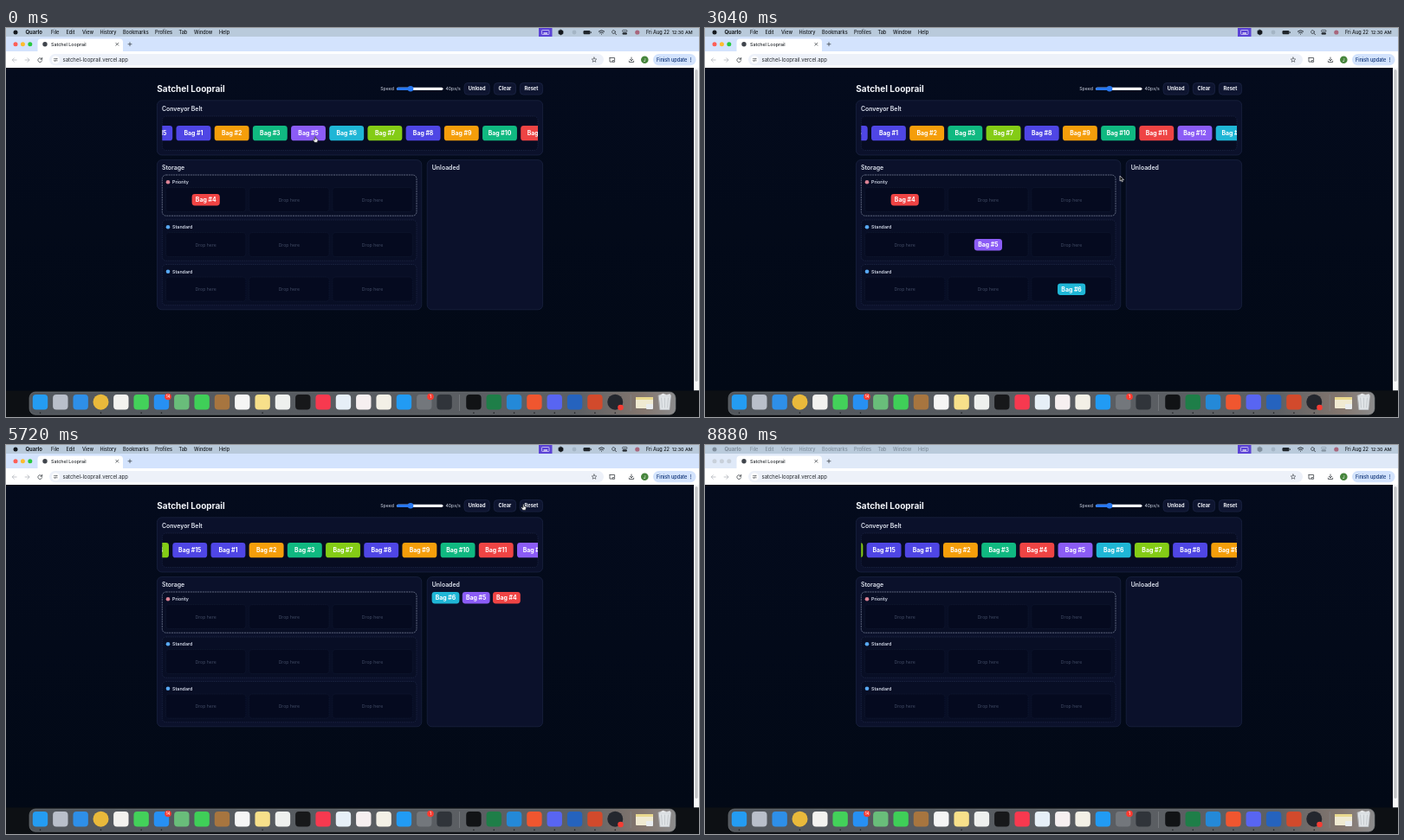
Write an HTML page with a canvas that moves like this. It is 800 px wide and 450 px high and loops after 8.92 s.

```html
<!DOCTYPE html>
<html lang="en">
<head>
<meta charset="utf-8">
<title>Satchel Looprail</title>
<style>
  html, body { margin: 0; width: 100%; height: 100%; overflow: hidden; background: #020818; }
  canvas { display: block; width: 800px; height: 450px; }
</style>
</head>
<body>
<canvas id="stage"></canvas>
<script>
const LOOP = 8920;
const DROP_A = 660, DROP_B = 2500, UNLOAD = 4640, RESET = 5980, BLUR = 8760;
const PITCH = 44.19, SPEED = 0.0166;
const FONT = 'Inter, "Open Sans", sans-serif';
const BAG_COLORS = ['#4f46e5', '#f59e0b', '#10b981', '#ef4444', '#8b5cf6', '#1fb6d6', '#84cc16'];
const SLOT_X = [184.5, 280.7, 376.9], RACK_Y = [170, 222, 273.5];

const canvas = document.getElementById('stage');
const ctx = canvas.getContext('2d');
const dpr = window.devicePixelRatio || 1;
canvas.width = 800 * dpr;
canvas.height = 450 * dpr;

function rect(x, y, w, h, color) {
  ctx.fillStyle = color;
  ctx.fillRect(x, y, w, h);
}

function box(x, y, w, h, r, fill, stroke, dash) {
  ctx.beginPath();
  ctx.roundRect(x, y, w, h, r);
  if (fill) { ctx.fillStyle = fill; ctx.fill(); }
  if (stroke) {
    ctx.setLineDash(dash || []);
    ctx.strokeStyle = stroke;
    ctx.lineWidth = 0.6;
    ctx.stroke();
    ctx.setLineDash([]);
  }
}

function dot(x, y, r, color) {
  ctx.beginPath();
  ctx.arc(x, y, r, 0, Math.PI * 2);
  ctx.fillStyle = color;
  ctx.fill();
}

function text(s, x, y, size, color, weight = 400, align = 'left') {
  ctx.font = `${weight} ${size}px ${FONT}`;
  ctx.textAlign = align;
  ctx.fillStyle = color;
  ctx.fillText(s, x, y);
}

function path(d, x, y, color, width = 0.8, fill) {
  ctx.save();
  ctx.translate(x, y);
  const p = new Path2D(d);
  if (fill) { ctx.fillStyle = fill; ctx.fill(p); }
  ctx.strokeStyle = color;
  ctx.lineWidth = width;
  ctx.lineCap = ctx.lineJoin = 'round';
  ctx.stroke(p);
  ctx.restore();
}

// Menu bar, tab strip and toolbar

function drawMenuBar(active) {
  rect(0, 0, 800, 10, '#b9cadb');
  const ink = active ? '#14181d' : '#7f8d9b';
  dot(11, 5, 2.5, ink);
  text('Quarlo', 22.5, 7, 5.9, ink, 700);
  const items = [['File', 52], ['Edit', 69.5], ['View', 88], ['History', 108.5], ['Bookmarks', 135],
    ['Profiles', 172], ['Tab', 199.5], ['Window', 217], ['Help', 246]];
  for (const [label, x] of items) text(label, x, 7, 5.5, ink, 500);

  rect(615, 0, 15.5, 10, '#5b43d6');
  box(618.5, 2.5, 8.5, 5, 0.8, null, '#fff');
  rect(620.5, 5.4, 4.5, 1.2, '#fff');
  path('M0 -3L2.6 -1.5V1.5L0 3L-2.6 1.5V-1.5Z', 640.5, 5, ink, 0.5, ink);
  dot(656, 5, 2.4, '#a4b5c5');
  box(666.5, 3, 8, 4.3, 1.2, '#20262c');
  rect(675, 4.3, 0.7, 1.7, '#20262c');
  path('M-3.2 -1Q0 -3.7 3.2 -1M-1.9 0.6Q0 -1 1.9 0.6M0 2.1V2.2', 687.5, 5, '#14181d', 0.9);
  path('M1.4 -0.4A1.9 1.9 0 1 1 1.4 -0.5M0.9 1L2.5 2.7', 702, 5, '#14181d', 0.7);
  box(711.5, 2.4, 5.5, 2.1, 1, null, ink);
  box(711.5, 5.4, 5.5, 2.1, 1, ink);
  dot(728.8, 5, 2.6, '#a8667c');
  text('Fri Aug 22', 739, 7, 5.5, '#14181d', 500);
  text('12:30 AM', 792.5, 7, 5.3, '#14181d', 500, 'right');
}

function drawBrowser(active) {
  rect(0, 10, 800, 17.5, active ? '#d3e3fd' : '#dfe9f8');
  const lights = active ? ['#fe5f57', '#febc2e', '#28c840'] : ['#c8d0da', '#c8d0da', '#c8d0da'];
  lights.forEach((c, i) => dot(11 + i * 8.4, 18.7, 2.5, c));
  box(36.5, 12.5, 98.5, 18, 4, '#fff');
  rect(0, 27, 800, 19, '#fff');
  dot(45, 18.7, 2.7, '#40454c');
  text('Satchel Looprail', 52, 20.6, 5.3, '#24282d', 500);
  path('M-1.5 -1.5L1.5 1.5M1.5 -1.5L-1.5 1.5', 128.3, 18.7, '#33383d', 0.7);
  path('M-2 0H2M0 -2V2', 143, 18.7, '#33383d', 0.7);

  path('M2.4 0H-2.4M-0.3 -2.2L-2.5 0L-0.3 2.2', 9.7, 37, '#b4b8be');
  path('M-2.4 0H2.4M0.3 -2.2L2.5 0L0.3 2.2', 24.5, 37, '#b4b8be');
  path('M2.1 -1A2.4 2.4 0 1 0 2.3 0.8M2.4 -2.6V-0.8H0.6', 39.3, 37, '#3c4146');
  box(50, 30, 640, 13.3, 6.6, '#edf1f9');
  dot(57.3, 36.7, 4.5, '#fff');
  path('M-2 -1.1H0M1.3 -1.1H2M-2 1.1H-1.3M0 1.1H2M0 -1.1A0.6 0.6 0 1 0 1.3 -1.1M-1.3 1.1A0.6 0.6 0 1 0 0 1.1',
    57.3, 36.7, '#3c4146', 0.6);
  text('satchel-looprail.vercel.app', 65.5, 38.8, 6, '#24282d');
  path('M0 -2.8L0.8 -0.9L2.8 -0.8L1.3 0.5L1.8 2.5L0 1.4L-1.8 2.5L-1.3 0.5L-2.8 -0.8L-0.8 -0.9Z',
    679, 36.8, '#3c4146', 0.6);
  path('M-2.8 -2.3H2.8V0M-2.8 -2.3V2.3H0M0.8 0.8H2.8V2.5H0.8Z', 699.8, 36.8, '#3c4146');
  path('M0 -2.8V1M-1.7 -0.5L0 1.2L1.7 -0.5M-2.6 1.3V2.7H2.6V1.3', 722, 36.8, '#3c4146');
  dot(737.3, 36.8, 4.3, '#46853c');
  text('J', 737.3, 38.6, 5, '#fff', 400, 'center');
  box(747, 30, 49.5, 13.3, 6.6, '#d3e3fd');
  text('Finish update', 751, 38.8, 5.5, '#0a2f73', 500);
  for (let i = -1; i < 2; i++) dot(790.5, 36.8 + i * 1.9, 0.55, '#0a2f73');
}

// Dock

const DOCK = ['#249cf2', '#b9bfca', '#2e8fe8', '#e9b93b', '#f3f2ef', '#43d15a', '#2790f3', '#69bd7a',
  '#3fcf58', '#a7753f', '#f5f5f5', '#f7e08a', '#eef0ee', '#17181a', '#f7394f', '#e6eff7', '#f6eff0',
  '#f3f0e6', '#219bf4', '#73777c', '#30343a', '#111315', '#1e7e48', '#2489d8', '#f0562f', '#5865f2',
  '#2563be', '#d24a2c', '#24272e'];
const ROUND = [3, 28];
const RUNNING = [0, 3, 5, 6, 11, 21, 22, 23, 24, 25, 26, 27, 28];

function badge(x, y, label) {
  dot(x, y, 3.8, '#fb3b30');
  text(label, x, y + 1.6, 4.4, '#fff', 500, 'center');
}

function drawDock() {
  rect(0, 419.5, 800, 30.5, '#0d1014');
  const g = ctx.createLinearGradient(27, 0, 773, 0);
  g.addColorStop(0, '#52575d');
  g.addColorStop(0.85, '#5d6064');
  g.addColorStop(0.95, '#85776f');
  g.addColorStop(1, '#8b8b8c');
  box(27, 421, 746, 26.3, 7, g, '#787c80');
  DOCK.forEach((c, i) => {
    const x = 39.5 + i * 23.33 + (i > 20 ? 10.5 : 0);
    if (ROUND.includes(i)) dot(x, 432.7, 9, c);
    else box(x - 8.7, 424, 17.4, 17.4, 4, c);
    if (RUNNING.includes(i)) dot(x, 445.3, 0.8, '#1b1d20');
  });
  badge(187, 426.5, '14');
  badge(490, 426.5, '1');
  dot(709.5, 439, 3.3, '#f43d34');
  rect(523, 424, 0.6, 19, '#85898d');
  rect(720.8, 424, 0.6, 19, '#85898d');
  box(727, 427, 20, 13, 1, '#f0ead2');
  rect(727, 427, 20, 3, '#ead98f');
  box(739, 435, 8, 6, 1, '#e9ecef');
  path('M-7 -8H7L5.3 8.5H-5.3Z', 760.5, 433, '#c4c9ce', 0.7, '#dfe3e6');
  path('M-4 -5L-3 6M0 -5V6M4 -5L3 6', 760.5, 433, '#b5babf', 0.6);
  path('M-6 -8L-2 -10L2 -8.5L6 -9.5L6.5 -8Z', 760.5, 433, '#d3d7da', 0.5, '#f5f6f7');
}

// App

function bag(n, x, y, w, h, alpha = 1) {
  ctx.globalAlpha = alpha;
  box(x, y, w, h, 3.4, BAG_COLORS[(n - 1) % 7]);
  text('Bag #' + n, x + w / 2, y + h / 2 + 2.45, 6.9, '#fff', 700, 'center');
  ctx.globalAlpha = 1;
}

function beltStart(t) {
  if (t < DROP_A) return 196.5 + t * SPEED;
  const [x, at] = t < DROP_B ? [199.5, 1680] : t < RESET ? [192, 3040] : [195.6, 6760];
  return x + (t - at) * SPEED;
}

function beltBags(t) {
  const gone = t < DROP_A ? [4] : t < DROP_B ? [4, 5] : t < RESET ? [4, 5, 6] : [];
  return Array.from({ length: 15 }, (_, i) => i + 1).filter(n => !gone.includes(n));
}

function drawBelt(t) {
  const bags = beltBags(t), x0 = beltStart(t);
  ctx.save();
  ctx.beginPath();
  ctx.rect(180.3, 102, 433.7, 39.5);
  ctx.clip();
  for (let i = -2; i < 10; i++) {
    bag(bags[(i + bags.length) % bags.length], x0 + i * PITCH, 113, 39.9, 17.3);
  }
  ctx.restore();
}

function button(label, x, w) {
  box(x, 63.5, w, 13.6, 4, '#0e1530', '#222c4d');
  text(label, x + w / 2, 72.4, 5.7, '#f1f3f9', 700, 'center');
}

function drawRack(r, stored) {
  const y = RACK_Y[r];
  box(180.3, y, 293.7, 47.2, 4.5, '#080e25', r ? '#252f50' : '#98a1b9', r ? [1.5, 1] : [2, 0.8]);
  dot(187, y + 8.2, 2.3, r ? '#58a9f3' : '#dd8496');
  text(r ? 'Standard' : 'Priority', 192, y + 10.1, 5.3, '#d3d9e8', 600);
  SLOT_X.forEach((x, c) => {
    box(x, y + 14.6, 92.3, 28, 3.5, '#050a1f', '#172039', [1.2, 0.8]);
    const n = stored[r + ',' + c];
    if (n) bag(n, x + 30.1, y + 22.1, 32.2, 13.4);
    else text('Drop here', x + 46.1, y + 30.6, 5.2, '#424c65', 400, 'center');
  });
}

function drawApp(t) {
  const g = ctx.createLinearGradient(0, 46, 0, 419);
  g.addColorStop(0, '#040b1d');
  g.addColorStop(1, '#020916');
  rect(0, 46, 800, 373.5, g);
  rect(794, 46, 6, 373.5, '#f7f7f8');
  box(795.3, 48, 3.4, 361, 1.7, '#c3c4c7');

  text('Satchel Looprail', 174.3, 74.4, 10, '#f4f6fb', 700);
  text('Speed', 432.2, 72.2, 5.2, '#d3d9e8');
  box(451, 68.7, 53.5, 3.2, 1.6, '#f2f3f5');
  box(451, 68.7, 16, 3.2, 1.6, '#2878f0');
  dot(467, 70.3, 3.3, '#2878f0');
  text('40px/s', 507.5, 72.2, 5.2, '#d3d9e8');
  button('Unload', 529, 29.3);
  button('Clear', 563.3, 25.3);
  button('Reset', 593.3, 26.3);

  const panel = (x, y, w, h, title) => {
    box(x, y, w, h, 5.5, '#0b112b', '#202a4b');
    text(title, x + 5.6, y + 11.7, 6.9, '#e3e8f3', 600);
  };
  panel(174.4, 83.8, 445.2, 63.2, 'Conveyor Belt');
  panel(174.4, 152.6, 305.4, 173.2, 'Storage');
  panel(486.2, 152.6, 133.4, 173.2, 'Unloaded');
  box(180.3, 102, 433.7, 39.5, 4.5, '#070c22', '#222c4c', [1.5, 1]);
  drawBelt(t);

  const stored = {};
  if (t < UNLOAD) {
    stored['0,0'] = 4;
    if (t >= DROP_A) stored['1,1'] = 5;
    if (t >= DROP_B) stored['2,2'] = 6;
  }
  for (let r = 0; r < 3; r++) drawRack(r, stored);
  if (t >= UNLOAD && t < RESET) {
    [6, 5, 4].forEach((n, i) => bag(n, 491.6 + i * 35.2, 170, 31.8, 13.4));
  }
}

// Pointer: time, x, y
const MOVES = [[0, 357, 127], [90, 357, 127], [600, 327, 251], [800, 327, 251], [1480, 362, 117],
  [1740, 362, 117], [2420, 422, 303], [2560, 422, 303], [3040, 479, 172], [3960, 572, 71],
  [4160, 572, 71], [4480, 545, 71], [5200, 545, 71], [5640, 597, 70], [6000, 600, 70],
  [7420, 600, 70], [8000, 560, 225], [8250, 560, 225], [8700, 622, 4]];

function pointer(t) {
  let i = 0;
  while (i < MOVES.length - 2 && t > MOVES[i + 1][0]) i++;
  const [t0, x0, y0] = MOVES[i], [t1, x1, y1] = MOVES[i + 1];
  const u = Math.min(1, Math.max(0, (t - t0) / (t1 - t0)));
  const e = u * u * (3 - 2 * u);
  return [x0 + (x1 - x0) * e, y0 + (y1 - y0) * e];
}

function drawGhost(t, n, from, to, index) {
  if (t < from || t >= to) return;
  const [gx, gy] = pointer(from), [x, y] = pointer(t);
  bag(n, beltStart(from) + index * PITCH + x - gx, 113 + y - gy, 39.9, 17.3, 0.65);
}

function drawPointer(t) {
  if (t >= BLUR) return;
  const [x, y] = pointer(t);
  const between = (a, b) => t >= a && t < b;
  const hand = t < 90 || between(1440, 1740) || between(3920, 7480);
  if (hand) {
    path('M-0.6 -1.8Q0 -2.5 0.6 -1.8V0.4L2.4 0.8Q3.2 1.1 3 2.1L2.4 4.6H-0.8L-2.6 1.9Q-2.6 1 -1.7 1.3L-0.6 2Z',
      x, y + 0.6, '#15181c', 0.6, '#fff');
  } else {
    path('M0 0V5.6L1.4 4.4L2.4 6.4L3.3 6L2.4 4.1H4.1Z', x, y - 0.5, '#fff', 0.6, '#0a0a0a');
  }
}

function draw(t) {
  const active = t < BLUR;
  ctx.setTransform(dpr, 0, 0, dpr, 0, 0);
  drawApp(t);
  drawMenuBar(active);
  drawBrowser(active);
  drawDock();
  drawGhost(t, 5, 90, DROP_A, 3);
  drawGhost(t, 6, 1740, DROP_B, 3);
  drawPointer(t);
}

let start;
function tick(now) {
  if (start === undefined) start = now;
  draw((now - start) % LOOP);
  requestAnimationFrame(tick);
}
requestAnimationFrame(tick);
</script>
</body>
</html>
```
